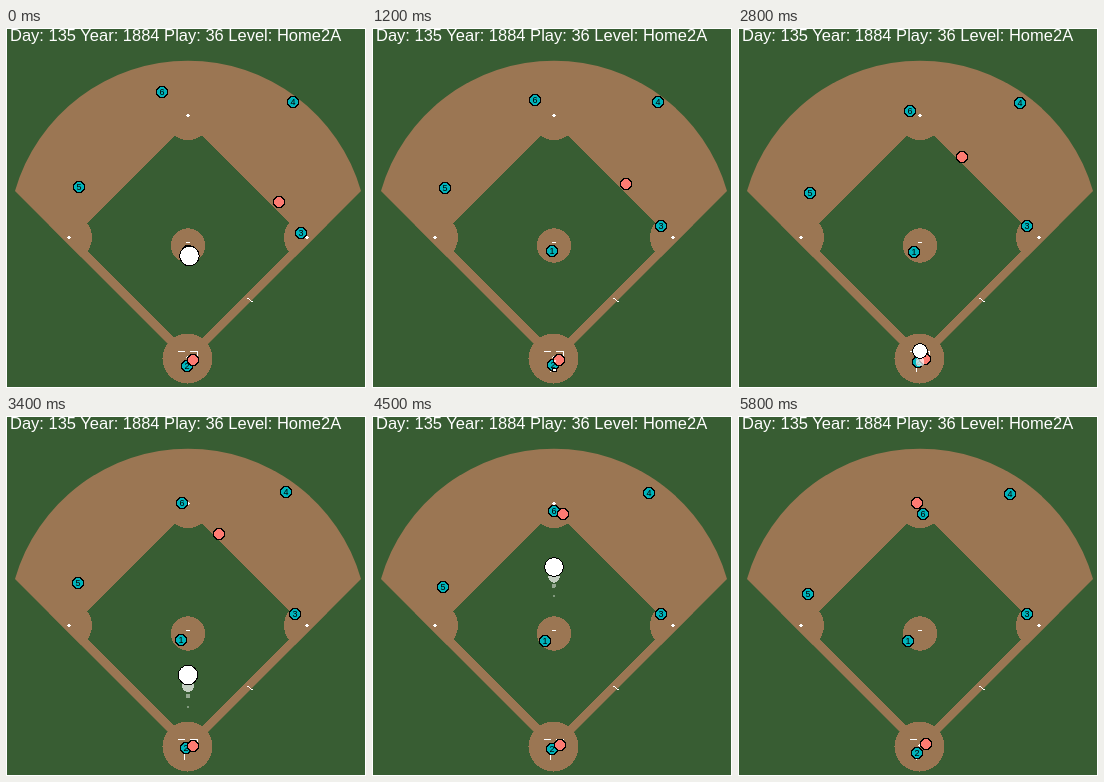
Animation of 360x360 px, one loop 5900 ms. Source, as an HTML page:

```html
<!DOCTYPE html>
<html lang="en">
<head>
<meta charset="utf-8">
<title>Baseball play</title>
<style>
  html, body { margin: 0; width: 100%; height: 100%; overflow: hidden; background: #385d33; }
  svg { display: block; width: 100vw; height: 100vh; shape-rendering: crispEdges; }
  text { font-family: "Liberation Sans", Arial, sans-serif; }
  .title { font-size: 16.5px; fill: #fff; }
  .dirt { fill: #9b7653; }
  .grass { fill: #385d33; }
  .chalk { fill: none; stroke: #fff; }
  .base { fill: #fff; }
  .man polygon { stroke: #000; }
  .man text { font-size: 9px; text-anchor: middle; }
  .ball { fill: #fff; stroke: #000; }
</style>
</head>
<body>
<svg viewBox="0 0 360 360">
  <defs>
    <clipPath id="fair"><path d="M182 336L9 163A180 180 0 0 1 355 163Z"/></clipPath>
  </defs>
  <rect class="grass" width="360" height="360"/>
  <g clip-path="url(#fair)">
    <rect class="dirt" width="360" height="360"/>
    <path class="grass" d="M182 94L297 209L182 324L67 209Z"/>
    <g class="dirt">
      <circle cx="62.5" cy="209.5" r="23.5"/>
      <circle cx="182" cy="88" r="24"/>
      <circle cx="301.5" cy="209.5" r="23.5"/>
    </g>
  </g>
  <circle class="dirt" cx="182" cy="217.5" r="17.2"/>
  <circle class="dirt" cx="181.5" cy="330.5" r="25"/>
  <path class="base" d="M61 209.5l2-2 2 2-2 2zM299 209.5l2-2 2 2-2 2zM180 87.5l2-2 2 2-2 2zM179.5 329.5l1.5-1.5 1.5 1.5-1.5 1.5z"/>
  <path class="chalk" d="M180 214.5h4M172 323.5h7M184 323.5h8M191.5 323v10M178.5 337v7M241.5 270l5 4"/>
  <rect class="chalk" x=".5" y=".5" width="359" height="359"/>
  <text class="title" x="4" y="13">Day: 135 Year: 1884 Play: 36 Level: Home2A</text>
  <g id="play"></g>
</svg>
<script>
const STEP = 100, STEPS = 59, LAST = 58;
const CYAN = '#00b3ba', SALMON = '#fe7b72';
const THROW = 27, CAUGHT = 51;
const play = document.getElementById('play');

// A man runs between two points; pow > 1 starts slowly, lift bows the path upwards.
const men = [
  { label: '1', from: [182, 223], to: [170, 225] },
  { label: '2', from: [181, 338], to: [179, 337], pow: 1.5, lift: 5.5 },
  { label: '3', from: [295, 205], to: [289, 198], end: 8 },
  { label: '4', from: [287, 74], to: [272, 78], pow: 1.5 },
  { label: '5', from: [73, 159], to: [70, 178], pow: 1.7 },
  { label: '6', from: [156, 64], to: [185, 98], end: 50 },
  { from: [187, 332], to: [188, 328], pow: 1.5 },
  { from: [273, 174], to: [179, 87], end: 51, pow: 1.1 }
];

const mix = (a, b, k) => a + (b - a) * k;

function add(tag, attrs, parent = play) {
  const el = document.createElementNS('http://www.w3.org/2000/svg', tag);
  for (const key in attrs) el.setAttribute(key, attrs[key]);
  return parent.appendChild(el);
}

function octagon(r) {
  return Array.from({ length: 8 }, (_, i) => {
    const a = (i + .5) * Math.PI / 4;
    return `${r * Math.cos(a)},${r * Math.sin(a)}`;
  }).join(' ');
}

for (const man of men) {
  man.el = add('g', { class: 'man' });
  add('polygon', { points: octagon(5.7), fill: man.label ? CYAN : SALMON }, man.el);
  if (man.label) add('text', { y: 3 }, man.el).textContent = man.label;
}

// Each dot shows where the ball was 'lag' steps ago.
const trail = [3, 2, 1].map(lag => ({
  lag,
  scale: .6 / lag ** 1.5,
  dot: add('circle', { fill: '#fff', 'fill-opacity': .7 / lag ** .6 })
}));
const ball = add('circle', { class: 'ball' });

function moveMan({ el, from, to, end = LAST, pow = 1, lift = 0 }, n) {
  const k = Math.min(1, n / end) ** pow;
  const x = mix(from[0], to[0], k);
  const y = mix(from[1], to[1], k) - lift * Math.sin(Math.PI * k) ** 2;
  el.setAttribute('transform', `translate(${Math.round(x)} ${Math.round(y)})`);
}

// Pitch, hold by the catcher, then the throw to second; r grows with height.
function ballAt(n) {
  if (n <= 12) {
    const p = n / 12;
    return { x: 183.5 - p, y: 227.5 + 122 * p - 8 * p * p, r: 9.8 - 7.8 * p * p };
  }
  if (n < THROW) {
    const k = Math.min(1, (n - 12) / 6);
    return { x: 182, y: mix(341.5, 332, k), r: mix(2, 6.7, k) };
  }
  const d = n - THROW, p = d / (CAUGHT - THROW);
  return { x: 182, y: 334 - 11.05 * d + .05 * d * d, r: 6.9 + 13.5 * p * (1 - p) };
}

function place(el, { x, y }, r) {
  el.setAttribute('cx', x);
  el.setAttribute('cy', Math.round(y));
  el.setAttribute('r', r);
}

function draw(n) {
  for (const man of men) moveMan(man, n);
  const now = ballAt(n);
  const live = n <= CAUGHT;
  const release = n <= 12 ? 0 : n >= THROW ? THROW : n;
  place(ball, now, live ? now.r : 0);
  for (const { lag, scale, dot } of trail) {
    const past = n - lag;
    const shown = live && past >= release;
    place(dot, ballAt(Math.max(past, 0)), shown ? now.r * scale : 0);
  }
}

function tick() {
  let n = Math.floor(performance.now() / STEP) % STEPS;
  if (n > 54) n -= n % 2; // the play ends on longer holds
  draw(n);
  requestAnimationFrame(tick);
}
tick();
</script>
</body>
</html>
```
